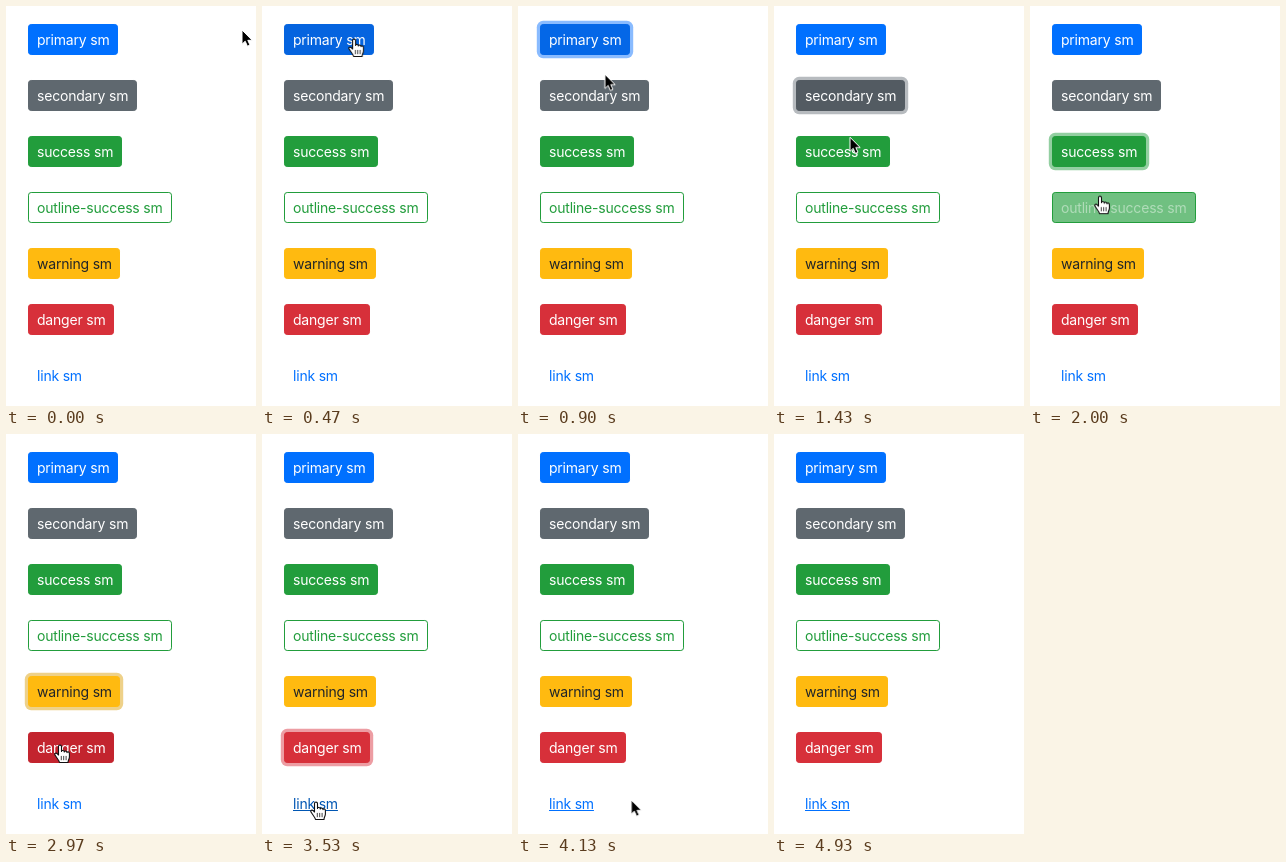
An HTML page that plays this animation: 250x400 px, repeating every 5 s.

```html
<!DOCTYPE html>
<html lang="en">
<head>
<meta charset="utf-8">
<title>Small buttons</title>
<style>
  html, body {
    margin: 0;
    width: 100%;
    height: 100%;
    overflow: hidden;
    background: #fff;
  }
  #stage {
    position: relative;
    width: 250px;
    height: 400px;
    overflow: hidden;
    font: 14px/21px Inter, Roboto, sans-serif;
    letter-spacing: -0.2px;
  }
  .btn {
    position: absolute;
    left: 22px;
    height: 31px;
    box-sizing: border-box;
    padding: 4px 8px;
    border: 1px solid;
    border-radius: 3.2px;
    white-space: nowrap;
  }
  #cursor {
    position: absolute;
    left: 0;
    top: 0;
    width: 1px;
    height: 1px;
    overflow: visible;
  }
</style>
</head>
<body>
<div id="stage">
  <svg id="cursor">
    <path id="arrow" d="M0 0V14.2L3.2 11.2L5.4 16.2L8 15.1L5.8 10.3H10.2Z"
          fill="#000" stroke="#fff" stroke-width="1" stroke-linejoin="round"/>
    <g id="hand" stroke="#111" stroke-width="1.1" stroke-linejoin="round" stroke-linecap="round">
      <path fill="#fff" d="M-1.5 1.5C-1.5 -.4 1.5 -.4 1.5 1.5V6.5C1.5 5 4.3 5 4.3 6.9C4.3 5.7 7 5.7 7 7.6
        C7 6.4 9.4 6.6 9.4 8.5V12C9.4 14 8 15 8 17.5H-.5C-.8 15.5 -4 12 -5 10C-5.8 8.4 -4 7.4 -2.8 8.7L-1.5 10Z"/>
      <path fill="none" stroke-width=".8" d="M1.3 11.3V14.8M3.7 11.3V14.8M6.1 11.3V14.8"/>
    </g>
  </svg>
</div>
<script>
const LOOP = 5000, FADE = 150, CLICK = 120;
const WHITE = '#ffffff', CLEAR = 'rgba(255,255,255,0)', GREEN = '#229d3c';
const stage = document.getElementById('stage');
const cursor = document.getElementById('cursor');

const solid = (bg, color = WHITE) => ({ backgroundColor: bg, borderColor: bg, color });
const outline = { backgroundColor: CLEAR, borderColor: GREEN, color: GREEN };
const link = color => ({ backgroundColor: CLEAR, borderColor: CLEAR, color });

// times: pointer enters, presses, leaves
const buttons = [
  { text: 'primary sm', width: 90, base: solid('#0070ff'), hover: solid('#0563dd'), active: solid('#055dd0'),
    ring: '20,120,255', times: [370, 590, 872] },
  { text: 'secondary sm', width: 109, base: solid('#5f686f'), hover: solid('#50585f'), active: solid('#4a5258'),
    ring: '112,120,128', times: [930, 1115, 1408] },
  { text: 'success sm', width: 94, base: solid(GREEN), hover: solid('#1c8033'), active: solid('#19762e'),
    ring: '40,160,68', times: [1445, 1620, 1890] },
  { text: 'outline-success sm', width: 144, base: outline, hover: solid(GREEN), active: solid(GREEN),
    ring: '34,157,60', times: [1945, 2130, 2265] },
  { text: 'warning sm', width: 92, base: solid('#ffba10', '#212529'), hover: solid('#e0a50f', '#212529'),
    active: solid('#d39a0c', '#212529'), ring: '222,163,20', times: [2310, 2600, 2815] },
  { text: 'danger sm', width: 86, base: solid('#d7303a'), hover: solid('#c0222d'), active: solid('#b61f2a'),
    ring: '220,60,72', times: [2880, 3085, 3245] },
  { text: 'link sm', width: 63, base: link('#0070ff'), hover: link('#0056b3'), active: link('#0056b3'),
    times: [3390, 3680, 3960] }
];

// time, x, y of the pointer tip; repeated places are rests
const path = [
  [0, 236, 24], [30, 236, 24, 'ease-in-out'],
  [480, 92, 33], [825, 92, 33],
  [900, 87, 68, 'ease-out'], [980, 82, 85], [1380, 81, 86],
  [1430, 76, 131, 'ease-out'], [1520, 74, 144], [1840, 74, 144],
  [2000, 70, 190, 'ease-out'], [2080, 69, 198], [2230, 69, 198],
  [2430, 57, 255, 'ease-out'], [2480, 55, 260], [2750, 55, 260, 'ease-in-out'],
  [2960, 54, 311], [3160, 54, 311],
  [3230, 54, 326, 'ease-out'], [3480, 54, 368], [3850, 54, 368, 'ease-in-out'],
  [4170, 115, 366, 'ease-out'], [4330, 121, 364], [4700, 121, 364, 'ease-in'],
  [4930, 253, 371], [LOOP, 253, 371]
];

function play(el, rows) {
  const frames = rows.map(([time, style, easing = 'linear']) => ({ ...style, offset: time / LOOP, easing }));
  el.animate(frames, { duration: LOOP, iterations: Infinity });
}

function addButton(b, i) {
  const el = document.createElement('div');
  el.className = 'btn';
  el.textContent = b.text;
  el.style.top = 18 + 56 * i + 'px';
  el.style.width = b.width + 'px';
  stage.insertBefore(el, cursor);

  const [enter, press, leave] = b.times;
  play(el, [
    [0, b.base], [enter, b.base, 'ease'], [enter + FADE, b.hover],
    [press, b.hover, 'ease'], [press + CLICK / 2, b.active, 'ease'], [press + CLICK, b.hover],
    [leave, b.hover, 'ease'], [leave + FADE, b.base], [LOOP, b.base]
  ]);

  if (b.ring) {
    const blur = buttons[i + 1].times[1];
    const off = { boxShadow: `0 0 0 0 rgba(${b.ring},0)` };
    const on = { boxShadow: `0 0 0 3.2px rgba(${b.ring},.5)` };
    play(el, [
      [0, off], [press, off, 'ease'], [press + FADE, on],
      [blur, on, 'ease'], [blur + FADE, off], [LOOP, off]
    ]);
  } else {
    const underline = { textDecorationLine: 'underline' };
    play(el, [[0, { textDecorationLine: 'none' }, 'step-end'], [enter, underline], [LOOP, underline]]);
  }
}

// Hard switch between visible and hidden at the edges of each hover
function switchShape(id, over) {
  const show = on => ({ opacity: on === over ? 1 : 0 });
  const rows = [[0, show(false), 'step-end']];
  for (const { times: [enter, , leave] } of buttons)
    rows.push([enter, show(true), 'step-end'], [leave, show(false), 'step-end']);
  rows.push([LOOP, show(false)]);
  play(document.getElementById(id), rows);
}

buttons.forEach(addButton);
switchShape('arrow', false);
switchShape('hand', true);
play(cursor, path.map(([t, x, y, easing]) => [t, { transform: `translate(${x}px, ${y}px)` }, easing]));
</script>
</body>
</html>
```
